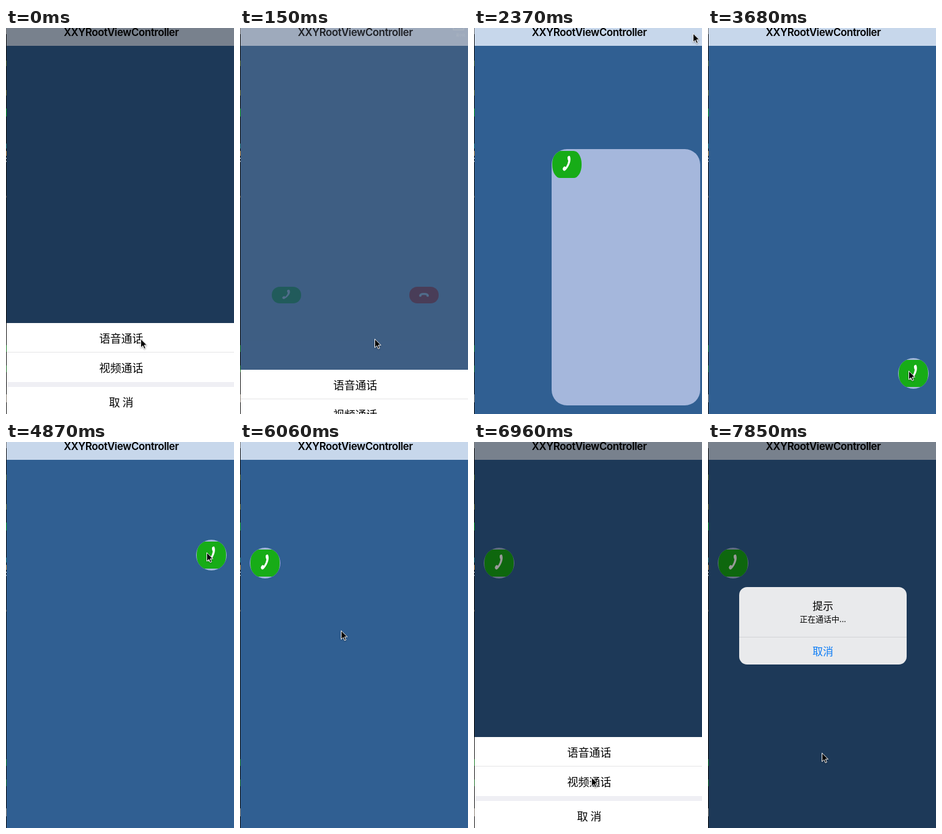
An HTML page that plays this animation: 373x628 px, repeating every 8 s.

```html
<!DOCTYPE html>
<html lang="zh">
<head>
<meta charset="utf-8">
<style>
html, body { margin: 0; width: 100%; height: 100%; overflow: hidden; background: #305f92; }
body { font-family: "Noto Sans CJK SC", "Noto Sans CJK", sans-serif; color: #000; }
div, svg { position: absolute; box-sizing: border-box; }
#stage { left: 0; top: 0; width: 373px; height: 628px; overflow: hidden; background: #305f92; }
#bar { left: 1px; top: 0; width: 372px; height: 29px; background: #c7d7eb; }
#title { left: 1px; top: -5px; width: 375px; line-height: 24px; text-align: center; white-space: nowrap;
  font: 600 17px/24px Inter, sans-serif; letter-spacing: -.41px; }
#card { overflow: hidden; background: rgba(194, 206, 239, .8); }
#mini { left: 345px; top: 33px; }
#dim { left: 1px; top: 0; width: 372px; height: 628px; background: #000; }
#sheet { left: 1px; top: 480px; width: 375px; height: 152px; background: #efeff4; }
.row { left: 0; width: 375px; height: 48px; background: #fff; font-size: 18px; line-height: 48px; text-align: center; }
#alert { left: 51px; top: 236px; width: 274px; height: 126px; border-radius: 13px; background: #e9eaec; text-align: center; }
#alert div { left: 0; width: 100%; }
#edge { left: 0; top: 0; width: 1px; height: 628px; background: #111; }
#edge div { left: 0; width: 1px; }
</style>
</head>
<body>
<div id="stage">
  <div id="bar"></div>
  <div id="title">XXYRootViewController</div>
  <div id="card">
    <svg id="accept" viewBox="0 0 48 27" preserveAspectRatio="none">
      <rect width="48" height="27" rx="13" fill="#17ac17"/>
      <path fill="#fff" d="M25 6Q27 4.2 29 5.2Q31 9 28.2 13Q25 17.8 20.2 20Q18 20.2 17 18Q17.5 16 20 15.3Q21.5 15.8 22.4 16Q25.6 13 26.2 10Q24.6 8.5 25 6Z"/>
    </svg>
    <svg id="reject" viewBox="0 0 48 27" width="48" height="27" style="left:276px;top:456px">
      <rect width="48" height="27" rx="13" fill="#dc1608"/>
      <path fill="#fff" d="M16 15Q16 10 24 10Q32 10 32 15Q31.5 16.8 29 16Q27.5 15.5 28 13.8Q24 12.6 20 13.8Q20.5 15.5 19 16Q16.5 16.8 16 15Z"/>
    </svg>
    <svg id="mini" width="28" height="18">
      <path d="M3 0V5H20V0M9 1.5H15" fill="none" stroke="#fff" stroke-width="1.4"/>
      <text x="15" y="14.5" font-size="5" fill="#fff" text-anchor="middle">最小化</text>
    </svg>
  </div>
  <div id="dim"></div>
  <div id="sheet">
    <div class="row" style="top:0;height:47px">语音通话</div>
    <div style="top:47px;width:375px;height:1px;background:#e4e4e6"></div>
    <div class="row" style="top:48px">视频通话</div>
    <div class="row" style="top:104px">取 消</div>
  </div>
  <div id="alert">
    <div style="top:18px;font:500 17px/24px 'Noto Sans CJK SC','Noto Sans CJK',sans-serif">提示</div>
    <div style="top:42px;font-size:13px;line-height:20px">正在通话中...</div>
    <div style="top:81px;height:1px;background:#d2d3d6"></div>
    <div style="top:92px;font:500 17px/24px 'Noto Sans CJK SC','Noto Sans CJK',sans-serif;color:#0b7cf6">取消</div>
  </div>
  <div id="edge"></div>
  <svg id="cursor" width="14" height="20" style="overflow:visible;filter:drop-shadow(0 1px 1px rgba(0,0,0,.35))">
    <path d="M.5 1V15L3.9 11.9 6.1 17 8.4 16 6.2 11H10.6Z" stroke="#fff" stroke-width="1"/>
  </svg>
</div>
<script>
const LOOP = 8000, TICK = 148.1, LAST = 53;
const el = id => document.getElementById(id);
const mix = (a, b, p) => a + (b - a) * p;

// Rows are [tick, ...values], joined linearly.
const cursorKeys = [
  [0, 220, 505], [7, 220, 505], [8, 323, 217], [10, 349, 62], [12, 355, 24], [15, 358, 8], [17, 358, 8],
  [20, 345, 300], [23, 330, 548], [24, 328, 557], [25, 328, 557], [27, 317, 440], [29, 305, 250],
  [30, 304, 180], [31, 314, 179], [32, 328, 179], [33, 287, 180], [35, 137, 188], [36, 40, 192],
  [37, 33, 192], [38, 33, 192], [39, 110, 258], [40, 165, 306], [44, 165, 306], [45, 180, 430],
  [46, 190, 530], [47, 192, 545], [50, 192, 545], [52, 187, 508], [53, 186, 505]
];
const bubbleKeys = [
  [25, 311, 537], [27, 300, 420], [29, 288, 230], [30, 287, 160], [31, 311, 159], [32, 311, 159],
  [33, 270, 160], [35, 120, 168], [36, 23, 172], [37, 16, 172]
];
const sheetKeys = [[0, 1], [1, .5], [2, 0], [41, 0], [42, .7], [43, 1], [48, 1], [49, .5], [50, 0]];
const dimKeys = [[0, .4], [1, .2], [2, 0], [41, 0], [42, .28], [43, .4]];
const fadeKeys = [[0, 0], [1, .25], [2, .8], [3, 1]];
const shrinkKeys = [[15, 0], [16, .406], [17, 1]];
const alertKeys = [[50, 0], [51, .75], [52, 1]];

function track(keys, n) {
  const i = keys.findIndex(k => k[0] >= n);
  if (i < 0) return keys[keys.length - 1].slice(1);
  if (i === 0) return keys[0].slice(1);
  const a = keys[i - 1], b = keys[i], p = (n - a[0]) / (b[0] - a[0]);
  return a.slice(1).map((v, j) => mix(v, b[j + 1], p));
}

function place(node, x, y, w, h) {
  node.style.left = x + 'px';
  node.style.top = y + 'px';
  node.style.width = w + 'px';
  node.style.height = h + 'px';
}

function drawCard(n) {
  const [p] = track(shrinkKeys, n), [x, y] = track(bubbleKeys, n);
  const small = p > 0, card = el('card');
  place(card, mix(1, x, p), mix(-35, y, p), mix(375, 50, p), mix(667, 50, p));
  card.style.borderRadius = small ? '25px' : '0';
  card.style.opacity = track(fadeKeys, n)[0];
  if (small) place(el('accept'), 1, 3, 48, 44);
  else place(el('accept'), 51, 456, 48, 27);
  el('reject').style.display = el('mini').style.display = small ? 'none' : '';
}

function draw(n) {
  const [cx, cy] = track(cursorKeys, n), [open] = track(sheetKeys, n), [pop] = track(alertKeys, n);
  drawCard(n);
  el('dim').style.opacity = track(dimKeys, n)[0];
  el('sheet').style.transform = `translateY(${(1 - open) * 152}px)`;
  el('alert').style.opacity = pop;
  el('alert').style.transform = `scale(${mix(1.15, 1, pop)})`;
  el('cursor').style.transform = `translate(${cx}px, ${cy}px)`;
}

// Sliver of the editor window behind the simulator.
[[0, 10, '#777'], [53, 9, '#4f5a1e'], [101, 9, '#66601f'], [131, 13, '#0a9a1c'], [188, 8, '#1c6f70'],
 [200, 8, '#c48a3c'], [211, 2, '#bbb'], [216, 2, '#aaa'], [273, 3, '#5a4630'], [516, 11, '#167a22'],
 [549, 11, '#1c6e26'], [596, 13, '#8a8074']].forEach(([y, h, color]) => {
  const bit = document.createElement('div');
  bit.style.cssText = `top:${y}px;height:${h}px;background:${color}`;
  el('edge').append(bit);
});

const start = performance.now();
function frame() {
  const t = (performance.now() - start) % LOOP;
  draw(Math.min(LAST, Math.floor((t + 16) / TICK)));
  requestAnimationFrame(frame);
}
frame();
</script>
</body>
</html>
```
